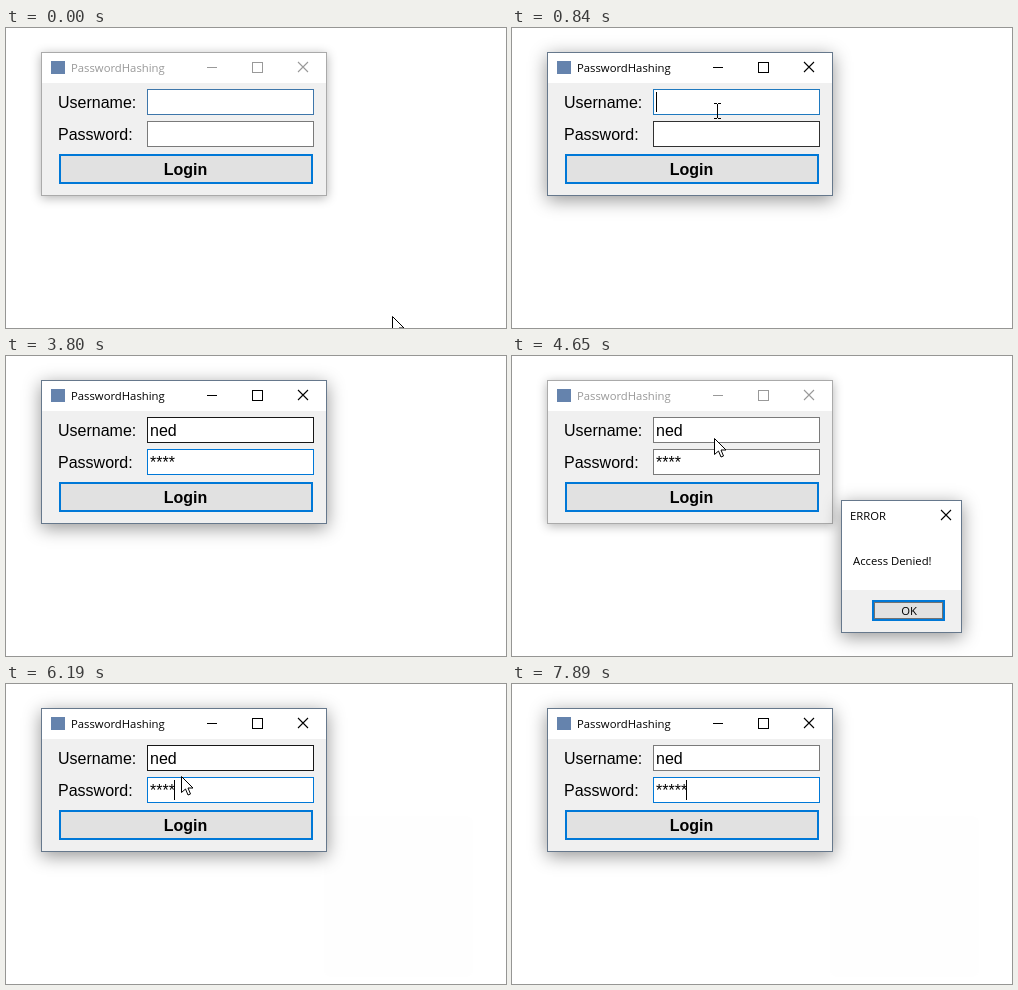
Write an HTML page with a canvas that moves like this. It is 500 by 300 pixels and loops after 8 s.

```html
<!DOCTYPE html>
<html lang="en">
<head>
<meta charset="utf-8">
<title>Login form</title>
<style>
html, body { margin: 0; width: 100%; height: 100%; overflow: hidden; background: #fff; }
canvas { display: block; }
</style>
</head>
<body>
<canvas id="stage" width="500" height="300"></canvas>
<script>
const ctx = document.getElementById('stage').getContext('2d', { alpha: false });
const LOOP = 8000, TICK = 77;
const UI = '11.3px "Open Sans", "Noto Sans", sans-serif';
const FORM = '16px "Liberation Sans", Arial, sans-serif';
const GRAY = [122, 122, 122], HOT = [23, 23, 23], BLUE = [0, 120, 215];
const ACCENT = '#0078d7', FACE = '#f0f0f0', HOVER = '#e5f1fb';

const userBorder = [[0, [62, 118, 170]], [300, GRAY], [609, GRAY], [920, BLUE], [2160, BLUE],
  [2470, HOT], [4350, HOT], [4650, GRAY], [5950, GRAY], [6180, HOT], [6260, HOT], [6730, GRAY]];
const passBorder = [[0, GRAY], [450, GRAY], [600, HOT], [760, HOT], [1070, GRAY], [2160, GRAY],
  [2470, BLUE], [4110, BLUE], [4350, GRAY], [5560, GRAY], [5800, BLUE]];
const userKeys = [1620, 1770, 1850];
const firstStars = [2780, 2950, 3100, 3250];
const secondStars = [7340, 7420, 7590, 7740, 7890];
const moves = [
  { start: 70, steps: 8, points: [[386, 288], [205, 83]] },
  { start: 4810, steps: 7, points: [[202, 82], [397, 254]] },
  { start: 5497, steps: 10, points: [[397, 254], [290, 160], [205, 82], [175, 92]] },
  { start: 6270, steps: 4, points: [[175, 92], [174, 109]] }
];

const within = (t, a, b) => t >= a && t < b;
const count = (t, times) => times.filter(k => t >= k).length;
const inside = (p, x, y, w, h) => p[0] >= x && p[0] < x + w && p[1] >= y && p[1] < y + h;
const mix = (a, b, k) => a.map((v, i) => v + (b[i] - v) * k);
const rgb = c => `rgb(${c.map(Math.round)})`;

function fade(t, keys) {
  let i = keys.length - 1;
  while (i > 0 && keys[i][0] > t) i--;
  const [from, a] = keys[i];
  if (i === keys.length - 1) return rgb(a);
  const [to, b] = keys[i + 1];
  return rgb(mix(a, b, (t - from) / (to - from)));
}

function mouseAt(t) {
  const move = moves.filter(m => t >= m.start).pop();
  if (!move) return moves[0].points[0];
  const k = Math.min(1, (Math.floor((t - move.start) / TICK) + 1) / move.steps);
  const eased = k * k * (3 - 2 * k);
  const last = move.points.length - 1;
  const i = Math.min(last - 1, Math.floor(eased * last));
  return mix(move.points[i], move.points[i + 1], eased * last - i).map(Math.round);
}

function rect(x, y, w, h, color) {
  ctx.fillStyle = color;
  ctx.fillRect(x, y, w, h);
}

function frame(x, y, w, h, color, line = 1) {
  ctx.strokeStyle = color;
  ctx.lineWidth = line;
  ctx.strokeRect(x + line / 2, y + line / 2, w - line, h - line);
}

function text(str, x, y, font, color = '#000', align = 'left') {
  ctx.font = font;
  ctx.fillStyle = color;
  ctx.textAlign = align;
  ctx.fillText(str, x, y);
}

function cross(x, y, color) {
  ctx.strokeStyle = color;
  ctx.lineWidth = 1.1;
  ctx.beginPath();
  ctx.moveTo(x, y); ctx.lineTo(x + 10, y + 10);
  ctx.moveTo(x + 10, y); ctx.lineTo(x, y + 10);
  ctx.stroke();
}

function panel(x, y, w, h, active) {
  ctx.save();
  ctx.shadowColor = active ? 'rgba(0,0,0,.42)' : 'rgba(0,0,0,.3)';
  ctx.shadowBlur = active ? 17 : 10;
  ctx.shadowOffsetY = active ? 4 : 2;
  rect(x, y, w, h, '#fff');
  ctx.restore();
  frame(x, y, w, h, active ? '#66788c' : '#aaaaaa');
}

function button(x, y, w, h, hover) {
  rect(x, y, w, h, hover ? HOVER : '#e1e1e1');
  frame(x, y, w, h, ACCENT, 2);
}

function field(y, border, value, selected) {
  rect(141, y, 167, 26, '#fff');
  frame(141, y, 167, 26, border);
  if (selected) rect(144, y + 3, 25, 20, ACCENT);
  text(value, 144, y + 19, FORM, selected ? '#fff' : '#000');
}

function drawForm(t, mouse, mouseShown) {
  const active = within(t, 686, 4120) || t >= 5574;
  const ink = active ? '#000' : '#999';
  panel(35, 24, 286, 144, active);
  rect(36, 55, 284, 112, FACE);
  rect(45, 33, 14, 13, '#6583ad');
  text('PasswordHashing', 65, 44, UI, ink);
  rect(201, 39, 10, 1, ink);
  frame(246, 34, 11, 11, ink);
  cross(292, 34, ink);

  text('Username:', 52, 80, FORM);
  text('Password:', 52, 112, FORM);
  const letters = count(t, userKeys);
  const retyped = count(t, secondStars);
  const stars = retyped || count(t, firstStars);
  const selected = within(t, 6580, 7340);
  field(61, fade(t, userBorder), 'ned'.slice(0, letters));
  field(93, fade(t, passBorder), '*'.repeat(stars), selected);

  if (within(t, 760, 1450) || within(t, 1620, 2170)) {
    rect(144 + Math.round(letters * 8.9), 64, 1, 20, '#000');
  }
  if (within(t, 2170, 3800) || within(t, 5650, 6230) || within(t, 6580, 7110) || t >= 7340) {
    rect(144 + Math.floor(stars * 6.1), 96, 1, 20, selected ? '#ff8728' : '#000');
  }
  const hover = mouseShown && !within(t, 4120, 5574) && inside(mouse, 53, 126, 254, 30);
  button(53, 126, 254, 30, hover);
  text('Login', 179.5, 147, 'bold ' + FORM, '#000', 'center');
}

function drawDialog(t, mouse) {
  if (!within(t, 4120, 5728)) return;
  const opening = Math.min(1, (Math.floor((t - 4120) / TICK) + 1) / 4);
  const closing = Math.max(0, Math.floor((t - 5497) / TICK) + 1) / 4;
  ctx.save();
  ctx.globalAlpha = Math.max(0, opening - closing);
  panel(329, 144, 121, 133, true);
  rect(330, 234, 119, 42, FACE);
  text('ERROR', 338, 164, UI);
  cross(429, 154, '#000');
  text('Access Denied!', 341, 209, UI);
  button(360, 244, 73, 21, inside(mouse, 360, 244, 73, 21));
  if (within(t, 5420, 5574)) rect(362, 246, 69, 17, '#cce4f7');
  ctx.setLineDash([1, 1]);
  frame(362, 246, 69, 17, '#000');
  ctx.setLineDash([]);
  text('OK', 397, 259, UI, '#000', 'center');
  ctx.restore();
}

function drawArrow([x, y]) {
  const outline = [[0, 0], [0, 16], [4, 12.5], [6.5, 18.5], [9, 17.5], [6.5, 11.5], [11.5, 11.5]];
  ctx.beginPath();
  outline.forEach(([dx, dy]) => ctx.lineTo(x + dx + .5, y + dy + .5));
  ctx.closePath();
  ctx.fillStyle = '#fff';
  ctx.fill();
  ctx.strokeStyle = '#000';
  ctx.lineWidth = 1;
  ctx.stroke();
}

function drawBeam([x, y]) {
  rect(x, y - 7, 1, 14, '#000');
  for (const edge of [y - 8, y + 7]) {
    rect(x - 3, edge, 3, 1, '#000');
    rect(x + 1, edge, 3, 1, '#000');
  }
}

function draw(t) {
  rect(0, 0, 500, 300, '#fff');
  if (t >= 5728) {
    ctx.fillStyle = '#fefefe';
    ctx.beginPath();
    ctx.roundRect(318, 132, 149, 161, 8);
    ctx.fill();
  }
  // The pointer hides while keys are being typed.
  const mouseShown = t < 1620 || within(t, 4120, 7340);
  const mouse = within(t, 4120, 4810) ? [202, 82] : mouseAt(t);
  drawForm(t, mouse, mouseShown);
  drawDialog(t, mouse);
  if (!mouseShown) return;
  const overText = !within(t, 4120, 5574) &&
    (inside(mouse, 141, 61, 167, 26) || inside(mouse, 141, 93, 167, 26));
  (overText ? drawBeam : drawArrow)(mouse);
}

const began = performance.now();
function tick() {
  draw((performance.now() - began) % LOOP);
  requestAnimationFrame(tick);
}
tick();
</script>
</body>
</html>
```
